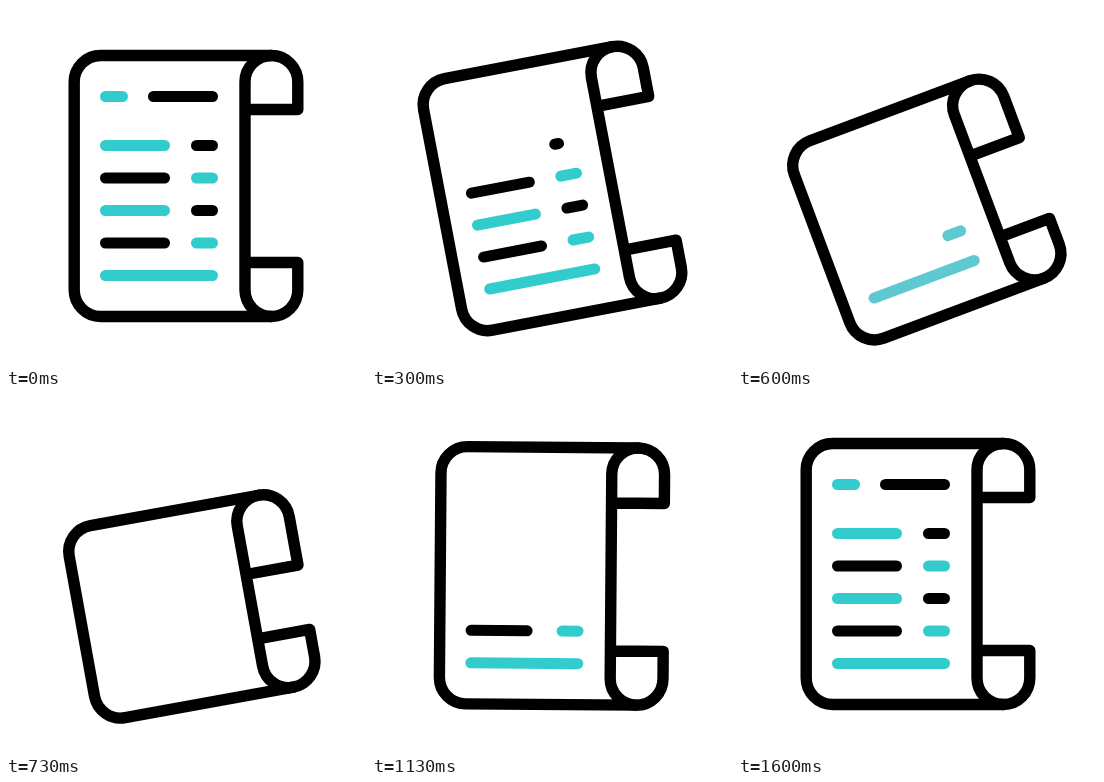
Write an HTML page with a canvas that moves like this. It is 360 by 360 pixels and loops after 2000 ms.

```html
<!DOCTYPE html>
<html lang="en">
<head>
<meta charset="utf-8">
<title>Scroll</title>
<style>
  html, body { margin: 0; width: 100%; height: 100%; overflow: hidden; background: #fff; }
  canvas { display: block; }
</style>
</head>
<body>
<canvas id="stage" width="360" height="360"></canvas>
<script>
const ctx = document.getElementById('stage').getContext('2d');
const LOOP = 2000, LAST_STEP = 48, STEPS_PER_MS = 0.03;
const BLACK = '#000', TEAL = '#33cccc', PALE_TEAL = '#60c8d0';

// Keyframes are [step, value]; 30 steps per second.
const TILT = [[0.75, 0], [17, -21.1], [29.5, 9.7], [37.2, -5.1], [47, 0]];
const ROLL = [[6, 0], [24.2, 68.7], [24.4, 68.7], [35.6, 0]];
const ERASED = [[2.72, 0], [21.1, 11]];
const WRITTEN = [[28.4, 0], [34, 2.95], [48, 11]];

// Bars in reading order: left end, right end, y, colour.
const bars = [[99.5, 116.5, 90.5, TEAL], [147.5, 206.5, 90.5, BLACK]];
for (let row = 0; row < 4; row++) {
  const y = 139.5 + row * 32.5, odd = row % 2;
  bars.push([99.5, 158.5, y, odd ? BLACK : TEAL], [190.5, 206.5, y, odd ? TEAL : BLACK]);
}
bars.push([99.5, 206.5, 269.5, TEAL]);

const linear = f => f;
const smooth = f => f * f * (3 - 2 * f);
const clamp = v => Math.min(1, Math.max(0, v));

function track(keys, step, ease) {
  let value = keys[0][1];
  for (let i = 1; i < keys.length; i++) {
    const [t0, v0] = keys[i - 1], [t1, v1] = keys[i];
    if (step >= t0) value = v0 + (v1 - v0) * ease(clamp((step - t0) / (t1 - t0)));
  }
  return value;
}

function drawPaper(roll) {
  const left = 68.2, fold = 239, right = 291.8, mid = (fold + right) / 2;
  const r = (right - fold) / 2, bottom = 310.5, top = 49.5 + roll;
  ctx.lineWidth = 11.4;
  ctx.strokeStyle = BLACK;

  ctx.beginPath();
  ctx.moveTo(mid, top);
  ctx.arcTo(left, top, left, bottom, r);
  ctx.arcTo(left, bottom, mid, bottom, r);
  ctx.lineTo(mid, bottom);
  ctx.stroke();

  const upperFlap = 103.5 + roll * 1.33, lowerFlap = 256.5;
  ctx.beginPath();
  ctx.moveTo(fold, upperFlap);
  ctx.lineTo(right, upperFlap);
  ctx.arc(mid, top + r, r, 0, Math.PI, true);
  ctx.arc(mid, bottom - r, r, Math.PI, 0, true);
  ctx.lineTo(right, lowerFlap);
  ctx.lineTo(fold, lowerFlap);
  ctx.stroke();
}

function drawBars(step) {
  const erased = track(ERASED, step, linear);
  const written = track(WRITTEN, step, linear);
  const teal = step > 16 && step < 33 ? PALE_TEAL : TEAL;
  ctx.lineWidth = 11;
  bars.forEach(([x0, x1, y, colour], i) => {
    const shown = step < 25
      ? 1 - clamp(erased - i)
      : clamp(written - (bars.length - 1 - i));
    if (shown < 0.001) return;
    ctx.strokeStyle = colour === TEAL ? teal : colour;
    ctx.beginPath();
    ctx.moveTo(x0, y);
    ctx.lineTo(x0 + (x1 - x0) * shown, y);
    ctx.stroke();
  });
}

function draw(time) {
  const step = Math.min(LAST_STEP, Math.floor((time % LOOP + 3.4) * STEPS_PER_MS));
  ctx.fillStyle = '#fff';
  ctx.fillRect(0, 0, 360, 360);
  ctx.save();
  ctx.lineCap = ctx.lineJoin = 'round';
  ctx.translate(180, 180);
  ctx.rotate(track(TILT, step, smooth) * Math.PI / 180);
  ctx.translate(-180, -180);
  drawPaper(track(ROLL, step, smooth));
  drawBars(step);
  ctx.restore();
}

const start = performance.now();
function tick() {
  draw(performance.now() - start);
  requestAnimationFrame(tick);
}
tick();
</script>
</body>
</html>
```
